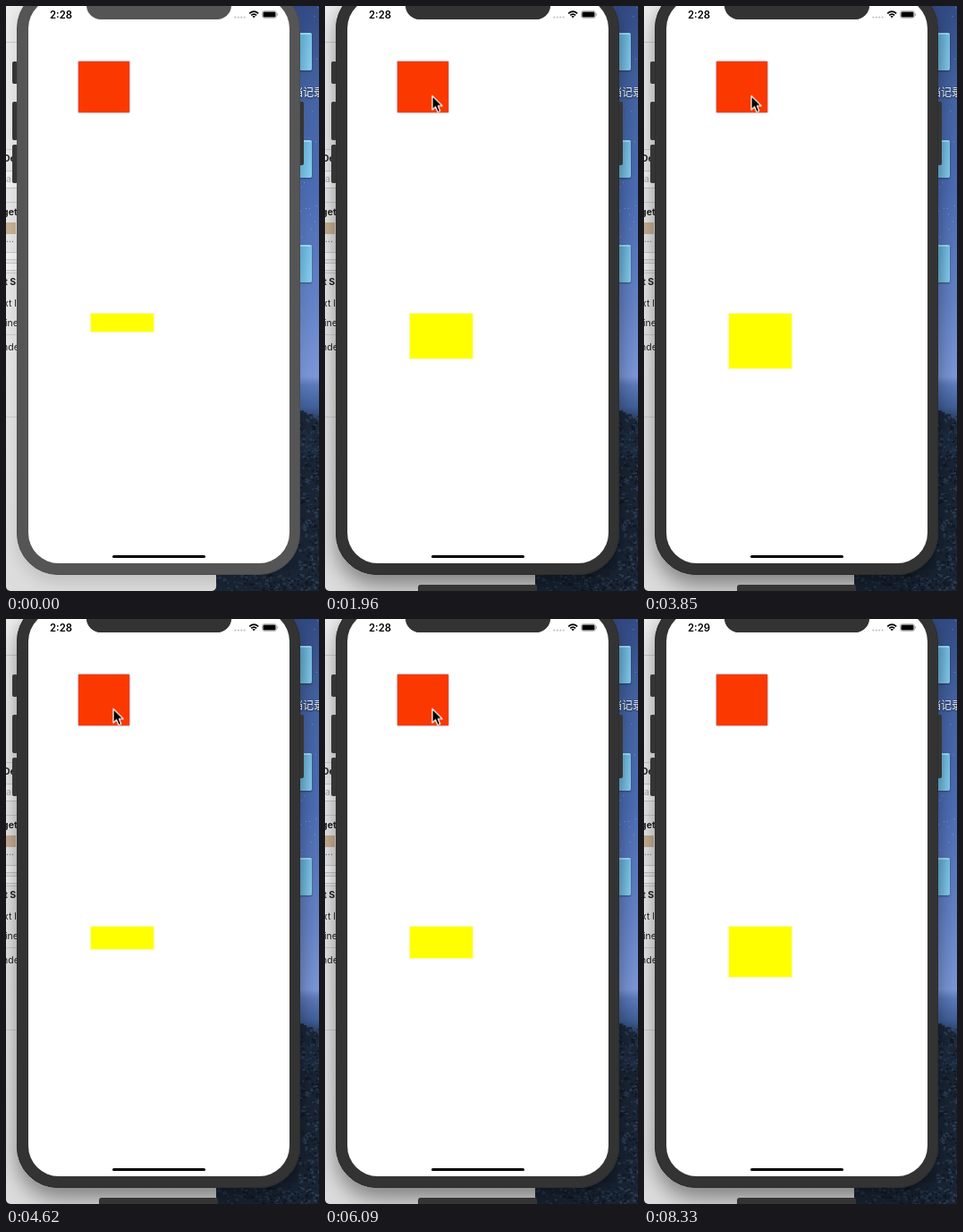
Write an HTML page with a canvas that moves like this. It is 350 px wide and 654 px high and loops after 8400 ms.

```html
<!DOCTYPE html>
<html lang="en">
<head>
<meta charset="utf-8">
<title>Tap to resize</title>
<style>
:root { --loop: 8400ms; }
html, body { margin: 0; width: 100%; height: 100%; overflow: hidden; }
#stage { position: relative; width: 350px; height: 654px; overflow: hidden; background: #10161f; }
#stage * { position: absolute; box-sizing: border-box; }

#sky {
  left: 225px; top: 0; width: 125px; height: 654px;
  background: linear-gradient(#334b85, #4463a2 90px, #4c6db5 210px, #6482c6 330px, #7b97d8 414px, #5c79bb 424px, #42609a 448px, #1f2e43 470px, #16202e 654px);
}
.folder {
  left: 312px; width: 30px; height: 42px; border-radius: 2px;
  background: linear-gradient(100deg, #68b4dc 55%, #8acfee);
  border-top: 2px solid #9ddcf4; box-shadow: 0 1px 2px #0006;
}
.caption { left: 320px; top: 88px; font: 500 12px/16px "Noto Sans CJK SC", "Noto Sans CJK", sans-serif; color: #fff; white-space: nowrap; text-shadow: 0 1px 2px #000a; }

#panel { left: 0; top: 0; width: 235px; height: 654px; background: linear-gradient(#ececec, #e6e6e6 60%, #dcdcdc); border-radius: 0 0 5px 5px; overflow: hidden; }
#panel hr { left: 0; width: 30px; height: 1px; margin: 0; border: 0; background: #ccc; }
#panel span { left: 0; font: 10.5px/14px Inter, sans-serif; color: #222; white-space: nowrap; }
#panel b { left: 0; font: 700 10.5px/14px Inter, sans-serif; color: #222; white-space: nowrap; }
.field { left: 0; width: 30px; background: #f4f4f4; border: solid #c8c8c8; border-width: 1px 0; }
.badge { left: 0; top: 242px; width: 11px; height: 13px; background: #c9b195; }

.shadow { left: 12px; top: -21px; width: 317px; height: 657px; border-radius: 46px; box-shadow: 0 8px 18px #0002; }
.shadow.deep { box-shadow: 0 14px 26px -2px #0005; }
.focus { opacity: 0; animation: focus var(--loop) step-end infinite; }
@keyframes focus { 0% { opacity: 0; } 9.1667%, 100% { opacity: 1; } }

.key { background: #353535; border-radius: 2px; }
.left { left: 7px; width: 6px; }
.shell { left: 12px; top: -21px; width: 317px; height: 657px; border-radius: 46px; background: #555; border: 1px solid #4c4c4c; }
.shell.focus { background: #333; border-color: #2d2d2d; }
#screen { left: 25px; top: -9px; width: 292px; height: 632px; border-radius: 34px; background: #fff; }
.notch { left: 90px; top: -12px; width: 162px; height: 27px; border-radius: 0 0 16px 16px; background: #555; }
.notch.focus { background: #333; }
#bar { left: 104px; top: 647px; width: 133px; height: 10px; border-radius: 3px 3px 0 0; background: #343434; }
#home { left: 119px; top: 613.5px; width: 104px; height: 3.3px; border-radius: 2px; background: #000; }

.clock { left: 49px; top: 2.7px; font: 600 11.3px/15px Inter, sans-serif; color: #000; }
.before { animation: before var(--loop) step-end infinite; }
.after { animation: after var(--loop) step-end infinite; }
@keyframes before { 0% { opacity: 1; } 81.6667%, 100% { opacity: 0; } }
@keyframes after { 0% { opacity: 0; } 81.6667%, 100% { opacity: 1; } }

#red { left: 81px; top: 62px; width: 56.5px; height: 56.5px; background: #fa3800; box-shadow: 0 0 2px #555b66; }
#yellow {
  left: 95px; top: 344px; width: 70px; height: 20px; background: #ff0;
  box-shadow: 0 0 2px 1px #f4f4b4; filter: blur(.5px);
  animation: resize var(--loop) ease-in-out infinite;
}
@keyframes resize {
  0%, 11.905% { height: 20px; }
  35.714%, 36.071% { height: 83.5px; }
  59.881%, 64.571% { height: 20px; }
  87.976% { height: 83.5px; animation-timing-function: cubic-bezier(.42, 0, .71, .5); }
  100% { height: 52px; }
}

#top { left: 0; top: 0; width: 350px; height: 654px; }
#ring { animation: press var(--loop) step-end infinite; }
@keyframes press {
  0% { opacity: 0; }
  10% { opacity: 1; }
  11.667% { opacity: 0; }
  34.167% { opacity: 1; }
  35.8% { opacity: 0; }
  62.5% { opacity: 1; }
  64.4% { opacity: 0; }
  85% { opacity: 1; }
  87.5%, 100% { opacity: 0; }
}
#cursor { animation: travel var(--loop) ease-in-out infinite; }
@keyframes travel {
  0%, 4% { transform: translate(150px, 670px); }
  8.8%, 89% { transform: translate(120px, 100.5px); }
  96.5%, 100% { transform: translate(140px, 670px); }
}
</style>
</head>
<body>
<div id="stage">
  <div id="sky"></div>
  <canvas id="trees" width="350" height="654"></canvas>
  <div class="folder" style="top:30px"></div>
  <div class="folder" style="top:150px"></div>
  <div class="folder" style="top:267px"></div>
  <div class="caption">档记录</div>

  <div id="panel">
    <hr style="top:40px"><hr style="top:160px"><hr style="top:219px"><hr style="top:298px"><hr style="top:367px"><hr style="top:459px">
    <div class="field" style="top:184px;height:20px"></div>
    <div class="field" style="top:275px;height:9px"></div>
    <div class="field" style="top:287px;height:9px"></div>
    <b style="top:164px;left:-3px">De</b>
    <span style="top:187px;color:#aaa">al</span>
    <b style="top:224px;left:-4px">get</b>
    <div class="badge"></div>
    <span style="top:254px;color:#777">...</span>
    <b style="top:302px;left:-2px">t S</b>
    <span style="top:326px;left:-3px">xt l</span>
    <span style="top:348px;left:-1px">ine</span>
    <span style="top:375px;left:-4px">nde</span>
  </div>

  <div class="shadow"></div>
  <div class="shadow deep focus"></div>
  <div class="key left" style="top:62px;height:25px"></div>
  <div class="key left" style="top:107px;height:43px"></div>
  <div class="key left" style="top:155px;height:43px"></div>
  <div class="key" style="left:327px;top:107px;width:6px;height:71px"></div>
  <div class="shell"></div>
  <div class="shell focus"></div>
  <div id="screen"></div>
  <div class="notch"></div>
  <div class="notch focus"></div>
  <div id="bar" class="focus"></div>

  <div class="clock before">2:28</div>
  <div class="clock after">2:29</div>
  <div id="red"></div>
  <div id="yellow"></div>
  <div id="home"></div>

  <svg id="top" viewBox="0 0 350 654">
    <path d="M255.5 12.7h12" stroke="#bbb" stroke-width="1.8" stroke-dasharray="1.8 1.6"/>
    <g fill="none" stroke="#000" stroke-width="1.7">
      <path d="M272.2 8.3q5-4.4 10 0M274.2 10.4q3-2.6 6 0"/>
      <path d="M276 11.7h2.4l-1.2 1.2z" stroke-width="1"/>
    </g>
    <rect x="286.5" y="5.5" width="16" height="8" rx="2.2" fill="none" stroke="#aaa" stroke-width=".8"/>
    <rect x="287.5" y="6.5" width="14" height="6" rx="1.2"/>
    <path d="M303.6 8.2v2.6" stroke="#aaa"/>
    <g id="ring" fill="none">
      <circle cx="120" cy="102" r="20.6" stroke="#fff" stroke-opacity=".75" stroke-width="1.2"/>
      <circle cx="120" cy="102" r="19.6" stroke="#000" stroke-opacity=".45" stroke-width=".8"/>
      <circle cx="120" cy="102" r="21.8" stroke="#000" stroke-width="1.2"/>
    </g>
    <g id="cursor">
      <path d="M0 0V15.5L3.6 12.2L6 18L8.8 16.8L6.4 11.2H11.2Z" stroke="#fff" stroke-width="1.2" stroke-linejoin="round"/>
    </g>
  </svg>
</div>
<script>
const ctx = document.getElementById("trees").getContext("2d");
let seed = 17;
const rand = (lo, hi) => {
  seed = (seed * 16807) % 2147483647;
  return lo + (hi - lo) * seed / 2147483647;
};
const dot = (color, x, y, w, h) => {
  ctx.fillStyle = color;
  ctx.fillRect(x, y, w, h);
};

// Faint stars
for (let i = 0; i < 26; i++) dot("#a9c4ee99", rand(329, 350), rand(0, 280), 1, 1);

// Tree crowns, then lighter needles
for (let i = 0; i < 130; i++) {
  const y = rand(452, 520);
  dot("#1b2738", rand(326, 332 + (y - 448) * .8), y, rand(2, 6), rand(2, 5));
}
dot("#1a2535", 326, 505, 24, 149);
dot("#1a2535", 230, 630, 120, 24);
for (let i = 0; i < 260; i++) dot(i % 2 ? "#111924" : "#2c3e55", rand(326, 350), rand(458, 654), rand(1, 4), rand(1, 3));
for (let i = 0; i < 130; i++) dot(i % 2 ? "#111924" : "#28384d", rand(235, 340), rand(634, 654), rand(1, 4), rand(1, 3));
</script>
</body>
</html>
```
